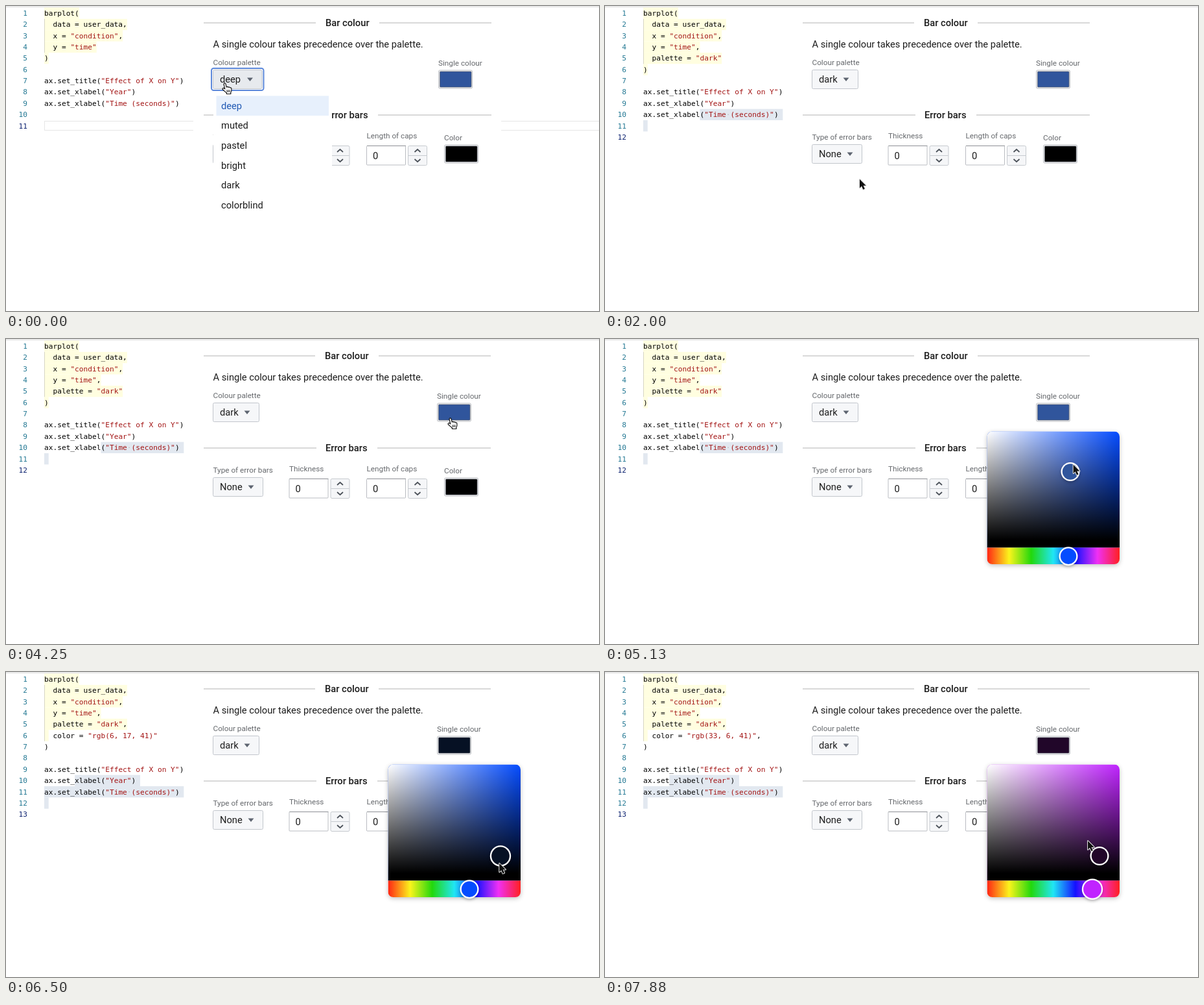
An HTML page with a canvas for the animation above (8000 ms loop, 915 px wide and 470 px high).

```html
<!DOCTYPE html>
<html lang="en">
<head>
<meta charset="utf-8">
<title>Plot options</title>
<style>
html, body { margin: 0; width: 100%; height: 100%; overflow: hidden; background: #fff; }
canvas { display: block; }
</style>
</head>
<body>
<canvas id="stage" width="915" height="470"></canvas>
<script>
const ctx = document.getElementById('stage').getContext('2d');
const LOOP = 8000;
const MENU_CLOSE = 1880, CODE_PALETTE = 2000, PICKER_OPEN = 4630;
const PICK_SHADE = 6130, CODE_SHADE = 6250, PICK_HUE = 7250, CODE_HUE = 7380;
const MONO = '11.18px "DejaVu Sans Mono", monospace';
const BODY = '14.7px Roboto, sans-serif';
const BOLD = '500 14.7px Roboto, sans-serif';
const SMALL = '11.76px Roboto, sans-serif';
const CHAR = 6.73, ROW = 17.35, CODE_X = 59;
const PALETTES = ['deep', 'muted', 'pastel', 'bright', 'dark', 'colorblind'];

// Cursor tip: time, x, y
const PATH = [
  [0, 335, 119], [100, 335, 119], [880, 374, 220], [1000, 374, 221],
  [1400, 393, 263], [1700, 393, 267], [2400, 393, 267], [3000, 666, 148],
  [3300, 668, 151], [3900, 669, 151], [4200, 683, 122], [4700, 683, 122],
  [5380, 740, 225], [5800, 764, 282], [6300, 764, 283], [6950, 752, 335],
  [7350, 752, 335], [7900, 745, 260], [8000, 743, 256]
];

function cursorAt(t) {
  const i = Math.max(1, PATH.findIndex(p => p[0] > t));
  const [t0, x0, y0] = PATH[i - 1], [t1, x1, y1] = PATH[i];
  const u = Math.max(0, (t - t0) / (t1 - t0));
  const k = u * u * (3 - 2 * u);
  return { x: x0 + (x1 - x0) * k, y: y0 + (y1 - y0) * k };
}

function pickedColor(t) {
  return t >= PICK_HUE ? 'rgb(33,6,41)' : t >= PICK_SHADE ? 'rgb(6,17,36)' : '#30559c';
}

function rect(x, y, w, h, fill) {
  ctx.fillStyle = fill;
  ctx.fillRect(x, y, w, h);
}

function box(x, y, w, h, radius, fill, stroke, width = 1) {
  ctx.beginPath();
  ctx.roundRect(x, y, w, h, radius);
  if (fill) { ctx.fillStyle = fill; ctx.fill(); }
  if (stroke) { ctx.strokeStyle = stroke; ctx.lineWidth = width; ctx.stroke(); }
}

function text(str, x, y, font = BODY, color = '#1c1c1c', align = 'left') {
  ctx.font = font;
  ctx.fillStyle = color;
  ctx.textAlign = align;
  ctx.fillText(str, x, y);
}

function codeLines(t) {
  const args = ['data = user_data', 'x = "condition"', 'y = "time"'];
  if (t >= CODE_PALETTE) args.push('palette = "dark"');
  if (t >= CODE_HUE) args.push('color = "rgb(33, 6, 41)"');
  else if (t >= CODE_SHADE) args.push('color = "rgb(6, 17, 41)"');
  const last = t >= CODE_HUE ? args.length : args.length - 1;
  return ['barplot(', ...args.map((a, i) => '  ' + a + (i < last ? ',' : '')), ')', '',
    'ax.set_title("Effect of X on Y")', 'ax.set_xlabel("Year")',
    'ax.set_xlabel("Time (seconds)")', '', ''];
}

function drawEditor(t) {
  const lines = codeLines(t), n = lines.length;
  const rowTop = i => 2.5 + ROW * i;
  const mark = (i, from, to, color) =>
    rect(CODE_X + from * CHAR, rowTop(i), (to - from) * CHAR, ROW, color);
  const end = lines.indexOf(')');
  for (let i = 0; i <= end && i < 6; i++) mark(i, 0, i < 5 ? lines[i].length : 1, '#fffee0');
  rect(CODE_X, rowTop(1), 1, ROW * (end - 1), '#d6d6c4');

  if (t < CODE_PALETTE) {
    ctx.strokeStyle = '#e6e6e6';
    ctx.lineWidth = 1;
    ctx.strokeRect(59.5, 177.5, 900, 14);
  } else {
    const selection = '#e2e8f0';
    if (t >= CODE_SHADE) {
      mark(n - 4, t >= CODE_HUE ? 6 : 7, 22, selection);
      mark(n - 3, 0, 32, selection);
    } else mark(n - 3, 13, 32, selection);
    mark(n - 2, 0, 1, selection);
    rect(CODE_X + 19.4 * CHAR, rowTop(n - 3) + 8, 1.3, 1.3, '#b4b8be');
  }

  lines.forEach((line, i) => {
    const y = 15 + ROW * i;
    text(i + 1, 33, y, MONO, i === n - 1 ? '#0b216f' : '#237893', 'right');
    let col = 0;
    line.split(/(".*")/).forEach((part, j) => {
      text(part, CODE_X + col * CHAR, y, MONO, j % 2 ? '#a31515' : '#000');
      col += part.length;
    });
  });
}

function heading(label, x, y, left, right, end) {
  rect(305, y - .5, left - 305, 1, '#b4b4b4');
  rect(right, y - .5, end - right, 1, '#b4b4b4');
  text(label, x, y + 5, BOLD);
}

function select(label, y, w, focused) {
  box(319.5, y + .5, w, 29, 2, focused ? '#e7eaee' : '#f6f7f9', '#c2c6cc');
  if (focused) box(317, y - 2, w + 5, 34, 3.5, null, '#5c88da', 2);
  text(label, 330, y + 20);
  const x = 319.5 + w - 18.5;
  ctx.beginPath();
  ctx.moveTo(x - 4.5, y + 12.5);
  ctx.lineTo(x + 4.5, y + 12.5);
  ctx.lineTo(x, y + 18);
  ctx.fillStyle = '#5d6470';
  ctx.fill();
}

function swatch(x, y, color) {
  box(x + .5, y + .5, 52, 28, 2, '#eeeff1', '#c0c2c6');
  box(x + 2.5, y + 2.5, 48.5, 24, 1, color, 'rgba(80,85,95,.6)');
}

function numberInput(x) {
  box(x + .5, 215.5, 60, 29.5, 1, '#fff', '#b9bcc1');
  rect(x + 1, 215, 60, 1, '#8d9095');
  text('0', x + 10, 236);
  box(x + 64.5, 215.5, 29, 30, 2, '#f5f6f8', '#c6cacf');
  rect(x + 65, 230, 28, 1, '#c6cacf');
  ctx.strokeStyle = '#4a5058';
  ctx.lineWidth = 1.7;
  for (const [y, dir] of [[223, -1], [238, 1]]) {
    ctx.beginPath();
    ctx.moveTo(x + 74.5, y - 2 * dir);
    ctx.lineTo(x + 79, y + 2 * dir);
    ctx.lineTo(x + 83.5, y - 2 * dir);
    ctx.stroke();
  }
}

function drawPanel(t) {
  const open = t < MENU_CLOSE, shift = open ? 1 : 0;
  const gray = '#65686c';
  rect(289, 3, 475, 467, '#fff');
  heading('Bar colour', 492 + shift, 26, 477 + shift, 575 + shift, 748 + shift);
  text('A single colour takes precedence over the palette.', 319.5, 64.4);
  text('Colour palette', 319.5, 91, SMALL, gray);
  text('Single colour', 665 + 2 * shift, 92, SMALL, gray);
  select(open ? 'deep' : 'dark', 98, open ? 75.5 : 71, open);
  swatch(665 + 2 * shift, 98.5, pickedColor(t));

  heading('Error bars', 493 + shift, 168, 479, 573 + shift, 748 + shift);
  text('Type of error bars', 319.5, 206, SMALL, gray);
  text('Thickness', 437, 203.5, SMALL, gray);
  text('Length of caps', 556.5, 203.5, SMALL, gray);
  text('Color', 676, 207, SMALL, gray);
  select('None', 213, 77, false);
  numberInput(436.5);
  numberInput(556);
  swatch(676, 213.5, '#000');
}

function drawMenu(t) {
  const fade = 1 - (t - MENU_CLOSE) / 110;
  if (fade <= 0) return;
  ctx.globalAlpha = Math.min(1, fade);
  rect(320, 133, 183, 195, '#fff');
  const top = 138.5, pitch = 30.65;
  const hover = Math.floor((cursorAt(t - 100).y - top) / pitch);
  PALETTES.forEach((name, i) => {
    const y = top + pitch * i;
    if (!i) rect(324.5, y, 173.5, 30.5, '#e7f0fc');
    else if (i === hover) rect(324.5, y, 173.5, 30.5, '#f0f0f0');
    text(name, 332, y + 20.2, BODY, i ? '#1c1c1c' : '#2059b4');
  });
  ctx.globalAlpha = 1;
}

function gradient(x0, y0, x1, y1, colors) {
  const g = ctx.createLinearGradient(x0, y0, x1, y1);
  colors.forEach((c, i) => g.addColorStop(i / (colors.length - 1), c));
  return g;
}

function disc(x, y, r, fill) {
  ctx.beginPath();
  ctx.arc(x, y, r, 0, 7);
  ctx.fillStyle = fill;
  ctx.fill();
}

function withShadow(blur, paint) {
  ctx.save();
  ctx.shadowColor = 'rgba(0,0,0,.25)';
  ctx.shadowBlur = blur;
  ctx.shadowOffsetY = 2;
  paint();
  ctx.restore();
}

function knob(x, y, r, fill) {
  withShadow(4, () => disc(x, y, r, '#fff'));
  disc(x, y, r - 2.3, fill);
}

function drawPicker(t) {
  if (t < PICKER_OPEN) return;
  const x = 589.5, y = 142.5, size = 204.5, bar = 321.5, base = 310;
  const shadePicked = t >= PICK_SHADE, huePicked = t >= PICK_HUE;
  const pure = huePicked ? '#c024ff' : '#044cff';
  withShadow(7, () => box(x, y, size, size, 8, '#fff'));

  ctx.save();
  ctx.beginPath();
  ctx.roundRect(x, y, size, size, 8);
  ctx.clip();
  rect(x, y, size, bar - y, pure);
  rect(x, y, size, bar - y, gradient(x, 0, x + size, 0, ['#fff', 'rgba(255,255,255,0)']));
  rect(x, y, size, bar - y, gradient(0, base, 0, y, ['#000', 'rgba(0,0,0,0)']));
  rect(x, bar, size, 26, gradient(x, 0, x + size, 0,
    ['#ff2414', '#fbf41c', '#22d80c', '#20e6f4', '#1410ff', '#f030f4', '#ff2020']));
  ctx.restore();

  const shade = pickedColor(t);
  if (shadePicked) knob(763, 283.5, huePicked ? 14.5 : 16.2, shade);
  else knob(718, 204.5, 14.5, shade);
  knob(huePicked ? 752 : 715, 334.7, huePicked ? 16.2 : 14.5, pure);
}

const ARROW = new Path2D('M0 0V13.4L3 10.6L5.3 15.8L7.8 14.7L5.5 9.7H9.7Z');
const HAND = new Path2D('M1 1.3C1.4-.6 3.6-.4 4 1.2L5.2 6C6.2 5 7.7 5.3 8 6.3C9 5.6 10.3 6 10.6 7' +
  'C11.7 6.5 12.8 7.2 12.9 8.4C13.2 11 12.9 12.6 11.8 14.2V16.5H5.4V15' +
  'C3.6 13.6 1.4 11.4-.5 9.8C-1.8 8.4.2 6.7 1.8 8L2.8 8.9Z');
const FINGERS = new Path2D('M5.9 10.3L6.2 14M8 10.2V14M10.1 10.2L9.9 14');

function drawCursor(t) {
  const { x, y } = cursorAt(t);
  const pointing = t < MENU_CLOSE || (t >= 4080 && t < 4800);
  ctx.save();
  ctx.translate(x, y);
  ctx.lineJoin = 'round';
  if (pointing) {
    ctx.fillStyle = '#fff';
    ctx.fill(HAND);
    ctx.strokeStyle = '#111';
    ctx.lineWidth = 1.2;
    ctx.stroke(HAND);
    ctx.lineWidth = .9;
    ctx.stroke(FINGERS);
  } else {
    ctx.strokeStyle = '#e4e4e4';
    ctx.lineWidth = 2;
    ctx.stroke(ARROW);
    ctx.fillStyle = '#111';
    ctx.fill(ARROW);
  }
  ctx.restore();
}

function draw(now) {
  const t = now % LOOP;
  rect(0, 0, 915, 470, '#fff');
  drawEditor(t);
  drawPanel(t);
  drawMenu(t);
  drawPicker(t);
  rect(0, 0, 915, 1, '#f2f2f2');
  rect(0, 1, 915, 1, '#dedede');
  drawCursor(t);
  requestAnimationFrame(draw);
}
requestAnimationFrame(draw);
</script>
</body>
</html>
```
